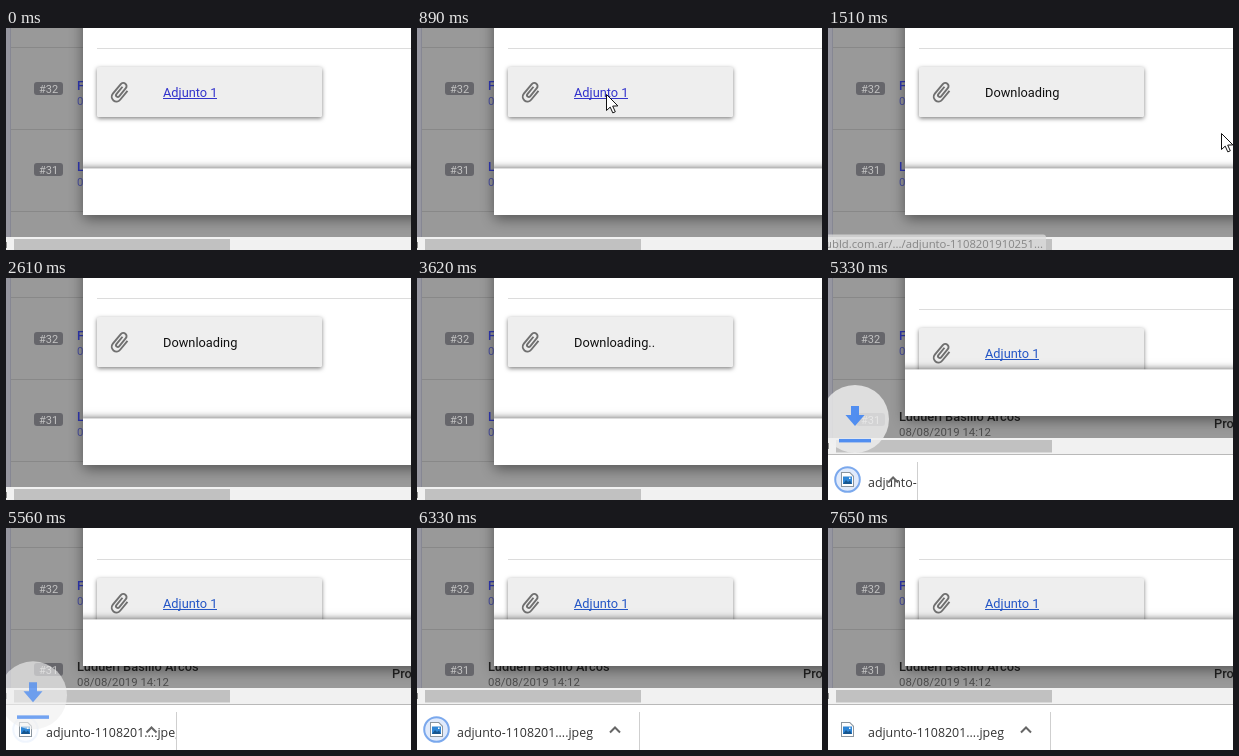
An HTML page with a canvas that plays this animation: 405x222 px, repeating every 8.28 s.

```html
<!DOCTYPE html>
<html lang="es">
<head>
<meta charset="utf-8">
<title>Descarga de adjunto</title>
<style>
  html, body { margin: 0; width: 100%; height: 100%; overflow: hidden; background: #999; }
  canvas { display: block; }
</style>
</head>
<body>
<canvas id="stage" width="405" height="222"></canvas>
<script>
const W = 405, H = 222, LOOP = 8280;
const ctx = document.getElementById('stage').getContext('2d');
const ROBOTO = 'Roboto, sans-serif', SYSTEM = '"Open Sans", sans-serif';

const CLICKED = 1120, RESTORED = 5000, SHELF = 5150, RESIZED = 5330;
// [time, number of dots after "Downloading"]
const DOTS = [[CLICKED, 0], [1620, 1], [2140, 2], [2610, 0], [3070, 1], [3620, 2], [4080, 0], [4620, 1]];
// Each track is a run of [time, x, y] for the pointer tip.
const POINTER = [
  [[70, 291, 218], [400, 262, 158], [700, 210, 84], [890, 189, 66], [970, 192, 62]],
  [[1200, 197, 59], [1270, 212, 62], [1400, 310, 86], [1510, 393, 105], [1600, 412, 112]],
  [[3070, 404, 111], [3320, 404, 111]],
  [[5640, 404, 96], [5950, 317, 119], [6030, 310, 165], [6140, 300, 225]],
  [[6900, 285, 222], [7150, 317, 135], [7350, 314, 150], [7600, 300, 225]]
];

const clamp = v => Math.max(0, Math.min(1, v));
const span = (t, from, length) => clamp((t - from) / length);

function box(x, y, w, h, color) {
  ctx.fillStyle = color;
  ctx.fillRect(x, y, w, h);
}

function round(x, y, w, h, r, color) {
  ctx.fillStyle = color;
  ctx.beginPath();
  ctx.roundRect(x, y, w, h, r);
  ctx.fill();
}

function text(str, x, y, font, color, align = 'left') {
  ctx.font = font;
  ctx.fillStyle = color;
  ctx.textAlign = align;
  ctx.fillText(str, x, y);
}

function line(points, color, width) {
  ctx.strokeStyle = color;
  ctx.lineWidth = width;
  ctx.beginPath();
  points.forEach(([x, y]) => ctx.lineTo(x, y));
  ctx.stroke();
}

function polygon(points, color) {
  ctx.fillStyle = color;
  ctx.beginPath();
  points.forEach(([x, y]) => ctx.lineTo(x, y));
  ctx.closePath();
  ctx.fill();
}

function scoped(draw) {
  ctx.save();
  draw();
  ctx.restore();
}

function shadow(color, blur, dy = 0) {
  ctx.shadowColor = color;
  ctx.shadowBlur = blur;
  ctx.shadowOffsetY = dy;
}

function clipTo(x, y, w, h) {
  ctx.beginPath();
  ctx.rect(x, y, w, h);
  ctx.clip();
}

function drawList(resized) {
  box(0, 0, W, H, '#999');
  box(0, 0, 4, H, '#9696a0');
  box(4, 0, 1, H, '#868793');
  for (const y of [19, 101, 183]) box(5, y, W, 1, '#888');
  const rows = [['#32', 60.5, 'F', '#3038b4'],
                ['#31', 141.5, 'Ludueri Basilio Arcos', resized ? '#222' : '#3038b4']];
  for (const [id, y, name, color] of rows) {
    round(28, y - 6.5, 29, 13, 3, '#66666b');
    text(id, 42.5, y + 4, '11px ' + ROBOTO, '#c2c2c2', 'center');
    text(name, 71, y + 1, '500 12.8px ' + ROBOTO, color);
    text('08/08/2019 14:12', 71, y + 16.5, '11.4px ' + ROBOTO, resized && y > 100 ? '#4c4c4c' : '#4a50a4');
  }
  text('Pro', 386, 150, '500 12.8px ' + ROBOTO, '#222');
}

function drawClip(cx, cy) {
  scoped(() => {
    ctx.translate(cx, cy);
    ctx.rotate(Math.PI * 0.22);
    ctx.translate(-12.5, -12);
    ctx.strokeStyle = '#707070';
    ctx.lineWidth = 1.9;
    ctx.beginPath();
    ctx.moveTo(17.25, 6);
    ctx.arc(12.5, 17.5, 4.75, 0, Math.PI);
    ctx.arc(11, 5, 3.25, Math.PI, 0);
    ctx.arc(12.5, 15.5, 1.75, 0, Math.PI);
    ctx.lineTo(10.75, 6);
    ctx.stroke();
  });
}

function drawLabel(t, y) {
  const font = '12.8px ' + ROBOTO;
  if (t >= CLICKED && t < RESTORED) {
    const dots = DOTS.filter(([at]) => t >= at).pop()[1];
    text('Downloading' + '.'.repeat(dots), 157, y, font, '#111');
    return;
  }
  const color = t < CLICKED ? '#3333cc' : t < RESIZED ? '#0000ee' : '#2456c6';
  text('Adjunto 1', 157, y, font, color);
  box(157, y + 1, 54, 1, color);
}

function drawModal(t, resized) {
  const dy = resized ? 11 : 0;
  const footer = resized ? 91.5 : 140.5;
  const bottom = footer + 46.5;
  scoped(() => {
    shadow('rgba(0,0,0,.45)', 14, 4);
    round(77, -30, W, bottom + 30, 3, '#fff');
  });
  scoped(() => {
    clipTo(77, 0, W, bottom);
    box(91, 20 + dy, W, 1, '#dcdcdc');
    scoped(() => {
      shadow('rgba(0,0,0,.5)', 4, 1.5);
      round(91, 39 + dy, 225, 50, 1.5, '#eee');
    });
    drawClip(114, 64.5 + dy);
    drawLabel(t, 69 + dy);
  });
  scoped(() => {
    clipTo(77, 0, W, bottom);
    shadow('rgba(0,0,0,.75)', 8);
    round(70, footer, W, 60, 0, '#fff');
  });
  scoped(() => {
    clipTo(77, footer, W, 50);
    round(77, footer, W, 46.5, [0, 0, 0, 3], '#fff');
  });
}

function drawScrollbar(y) {
  box(0, y, W, 16, '#f1f1f1');
  box(8, y + 2, 216, 12.5, '#c1c1c1');
  box(0, y + 5, 1, 6, '#8a8a8a');
}

function drawStatus(t) {
  const alpha = t < 1300 ? span(t, 930, 120) : 1 - span(t, 1450, 260);
  if (alpha <= 0 || t > 1740) return;
  scoped(() => {
    ctx.globalAlpha = alpha;
    round(-4, 206.5, 222, 20, [0, 3, 0, 0], '#dedede');
    text('ubld.com.ar/.../adjunto-1108201910251...', 215, 220, '11.3px ' + SYSTEM, '#6c6c6c', 'right');
  });
}

function drawFileIcon(x, y) {
  polygon([[x, y], [x + 9, y], [x + 13, y + 4], [x + 13, y + 15], [x, y + 15]], '#8b959e');
  polygon([[x + 1, y + 1], [x + 8.5, y + 1], [x + 12, y + 4.5], [x + 12, y + 14], [x + 1, y + 14]], '#fff');
  box(x + 2, y + 4.5, 9, 7.5, '#2f86d6');
  polygon([[x + 2, y + 12], [x + 5, y + 8], [x + 7, y + 10], [x + 9, y + 8.5], [x + 11, y + 12]], '#17568f');
  box(x + 8, y + 5.5, 1.5, 1.5, '#fff');
}

function drawShelf(t) {
  const top = 225 - 49 * span(t, SHELF, 120);
  const grow = span(t, SHELF, 800);
  const width = 222 * (1 - (1 - grow) ** 2);
  const pulse = (1 + Math.cos(5 * Math.PI * span(t, SHELF, 2500))) / 2;
  box(0, top, W, 50, '#fff');
  box(0, top, W, 1, '#b9b9b9');
  scoped(() => {
    clipTo(0, top, width, 50);
    ctx.globalAlpha = pulse;
    ctx.beginPath();
    ctx.arc(19.5, top + 25.5, 12.3, 0, 2 * Math.PI);
    ctx.fillStyle = '#d3e2f9';
    ctx.fill();
    ctx.strokeStyle = '#4a88e6';
    ctx.lineWidth = 2;
    ctx.stroke();
    ctx.globalAlpha = 1;
    drawFileIcon(13, top + 18);
    text('adjunto-1108201....jpeg', 40, top + 33, '12.4px ' + SYSTEM, '#333');
    const x = width - 24;
    line([[x - 5, top + 28.5], [x, top + 23.5], [x + 5, top + 28.5]], '#666', 2);
  });
  box(Math.round(width), top + 8, 1, 45, '#cfcfcf');
}

function drawFallingArrow(t) {
  const p = (t - 5110) / 600;
  if (t < 5165 || p >= 1) return;
  scoped(() => {
    ctx.globalAlpha = 1 - 4 * (p - 0.5) ** 2;
    ctx.translate(27, 115.5 + 69 * p);
    ctx.beginPath();
    ctx.arc(0, 0, 34, 0, 2 * Math.PI);
    ctx.fillStyle = 'rgba(240,240,240,.85)';
    ctx.fill();
    polygon([[-4, -13], [4, -13], [4, -4], [9.5, -4], [0, 7], [-9.5, -4], [-4, -4]], '#4688f1');
    box(-16, 20, 32, 3.5, '#4688f1');
  });
}

function drawArrowPointer(x, y) {
  const shape = [[0, 0], [0, 16], [3.7, 12.6], [6.3, 18.4], [8.8, 17.3], [6.2, 11.6], [11.4, 11.4]];
  scoped(() => {
    ctx.translate(x + 0.5, y + 0.5);
    polygon(shape, '#fff');
    line([...shape, shape[0]], '#111', 1);
  });
}

function drawHand(x, y) {
  scoped(() => {
    ctx.translate(x, y);
    ctx.beginPath();
    ctx.roundRect(4, 0.5, 3.5, 13, 1.7);
    ctx.roundRect(4, 7, 10.5, 11.5, 3);
    ctx.strokeStyle = '#111';
    ctx.lineWidth = 2;
    ctx.stroke();
    ctx.fillStyle = '#fff';
    ctx.fill();
    polygon([[4, 10], [0.5, 9.5], [5, 17]], '#fff');
    line([[4, 10], [0.5, 9.5], [5, 17]], '#111', 1);
  });
}

function drawPointer(t) {
  if (t >= 970 && t < 1200) return drawHand(189, 55);
  const track = POINTER.find(p => t >= p[0][0] && t < p[p.length - 1][0]);
  if (!track) return;
  const i = track.findIndex(([at]) => at > t);
  const [t0, x0, y0] = track[i - 1], [t1, x1, y1] = track[i];
  const k = (t - t0) / (t1 - t0);
  drawArrowPointer(Math.round(x0 + (x1 - x0) * k), Math.round(y0 + (y1 - y0) * k));
}

function draw(t) {
  const resized = t >= RESIZED;
  drawList(resized);
  drawModal(t, resized);
  drawScrollbar(resized ? 160 : 209);
  drawStatus(t);
  if (t >= SHELF) drawShelf(t);
  drawFallingArrow(t);
  drawPointer(t);
}

const start = performance.now();
function tick() {
  draw((performance.now() - start) % LOOP);
  requestAnimationFrame(tick);
}
tick();
</script>
</body>
</html>
```
